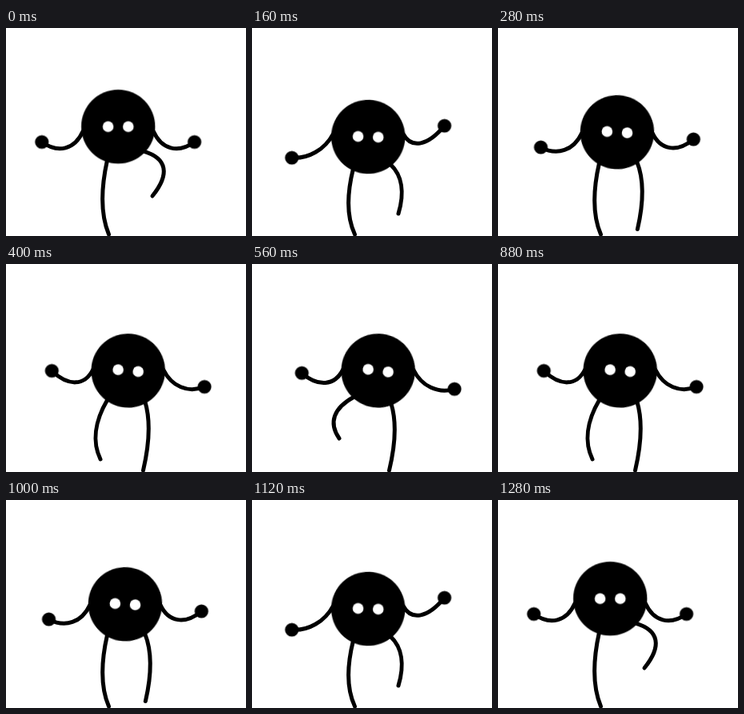
An HTML page that plays this animation: 300 by 260 pixels, repeating every 1320 ms.

```html
<!DOCTYPE html>
<html lang="en">
<head>
<meta charset="utf-8">
<title>Dancing ball</title>
<style>
  html, body { margin: 0; width: 100%; height: 100%; overflow: hidden; background: #fff; }
  svg { display: block; width: 300px; height: 260px; }
  path { fill: none; stroke: #000; stroke-width: 5; stroke-linecap: round; }
  .eye { fill: #fff; }
</style>
</head>
<body>
<svg viewBox="0 0 300 260">
  <path id="legL"/>
  <path id="legR"/>
  <path id="armL"/>
  <path id="armR"/>
  <circle id="handL" r="8.6"/>
  <circle id="handR" r="8.6"/>
  <g id="body">
    <circle r="46.2"/>
    <circle class="eye" cx="-12.6" r="6.8"/>
    <circle class="eye" cx="12.6" r="6.8"/>
  </g>
</svg>
<script>
const LOOP = 1320, BEAT = 160, FRAME = 40;
const LAST = 4; // beats from the left end of the sway to the right end
const TILT = 2.1, REACH = 95.4, ARM = 63.5, HIP = 44.5, FLOOR = 258;

const bodyX = i => 140.2 + 5 * i;
const bodyY = [123.3, 136, 128.3, 138.3, 128.3];
const handY = [142.5, 142.2, 144.7, 142.3, 150.3];

// For each leg: standing place, knee height, then values for 0, 1 and 2 beats of lifting
const sides = {
  L: { dir: -1, foot: 128.5, knee: 0.4, lift: [0, 28, 52], out: [0, 21, 18], bend: [9, 17, 22] },
  R: { dir: 1, foot: 171.5, knee: 0.25, lift: [0, 26, 48], out: [0, 11.5, 11.5], bend: [7, 12, 27] }
};

const along = ([x, y], [u, v], k) => [x + (u - x) * k, y + (v - y) * k];
const shift = ([x, y], dx, dy) => [x + dx, y + dy];
const curve = (a, b, c, d) => ({ d: `path("M ${a.join(' ')} C ${[...b, ...c, ...d].join(' ')}")` });
const move = ([x, y], deg = 0) => ({ transform: `translate(${x}px, ${y}px) rotate(${deg}deg)` });

// The hands swing in opposite directions
const hand = ({ dir }, i) =>
  [bodyX(i) + dir * REACH, handY[i] - dir * 20 * Math.sin(i * Math.PI / 2)];

// An arm of fixed length sags more when its ends are closer
function arm(side, i) {
  const from = [bodyX(i) + side.dir * 44, 129 + 0.3 * (bodyY[i] - bodyY[0])];
  const to = hand(side, i);
  const chord = Math.hypot(to[0] - from[0], to[1] - from[1]);
  const sag = 0.58 * Math.sqrt(ARM ** 2 - chord ** 2);
  return curve(from, shift(along(from, to, 0.2), 0, sag), shift(along(from, to, 0.6), 0, sag), to);
}

// The hip slides round the body towards the lifted side; the knee bends outward
function leg({ dir, foot, knee, lift, out, bend }, i) {
  const step = dir < 0 ? i : LAST - i;
  const up = Math.max(0, step - 2);
  const angle = (18 + 7 * step) * Math.PI / 180;
  const hip = [bodyX(i) + dir * HIP * Math.sin(angle), bodyY[i] + HIP * Math.cos(angle)];
  const toe = [foot + dir * out[up], FLOOR - lift[up]];
  const dx = toe[0] - hip[0], dy = toe[1] - hip[1];
  const k = dir * bend[up] / Math.hypot(dx, dy);
  const bent = p => shift(along(hip, toe, p), dy * k, -dx * k);
  return curve(hip, bent(knee), bent(knee + 0.35), toe);
}

function play(id, pose) {
  const keys = [];
  for (let n = 0; n <= 2 * LAST; n++) {
    keys.push({ ...pose(LAST - Math.abs(LAST - n)), offset: n * BEAT / LOOP });
  }
  keys.push({ ...pose(0), offset: 1 });
  document.getElementById(id).animate(keys, {
    duration: LOOP,
    iterations: Infinity,
    easing: `steps(${LOOP / FRAME}, end)`
  });
}

play('body', i => move([bodyX(i), bodyY[i]], TILT * i));

for (const [name, side] of Object.entries(sides)) {
  play('leg' + name, i => leg(side, i));
  play('arm' + name, i => arm(side, i));
  play('hand' + name, i => move(hand(side, i)));
}
</script>
</body>
</html>
```
